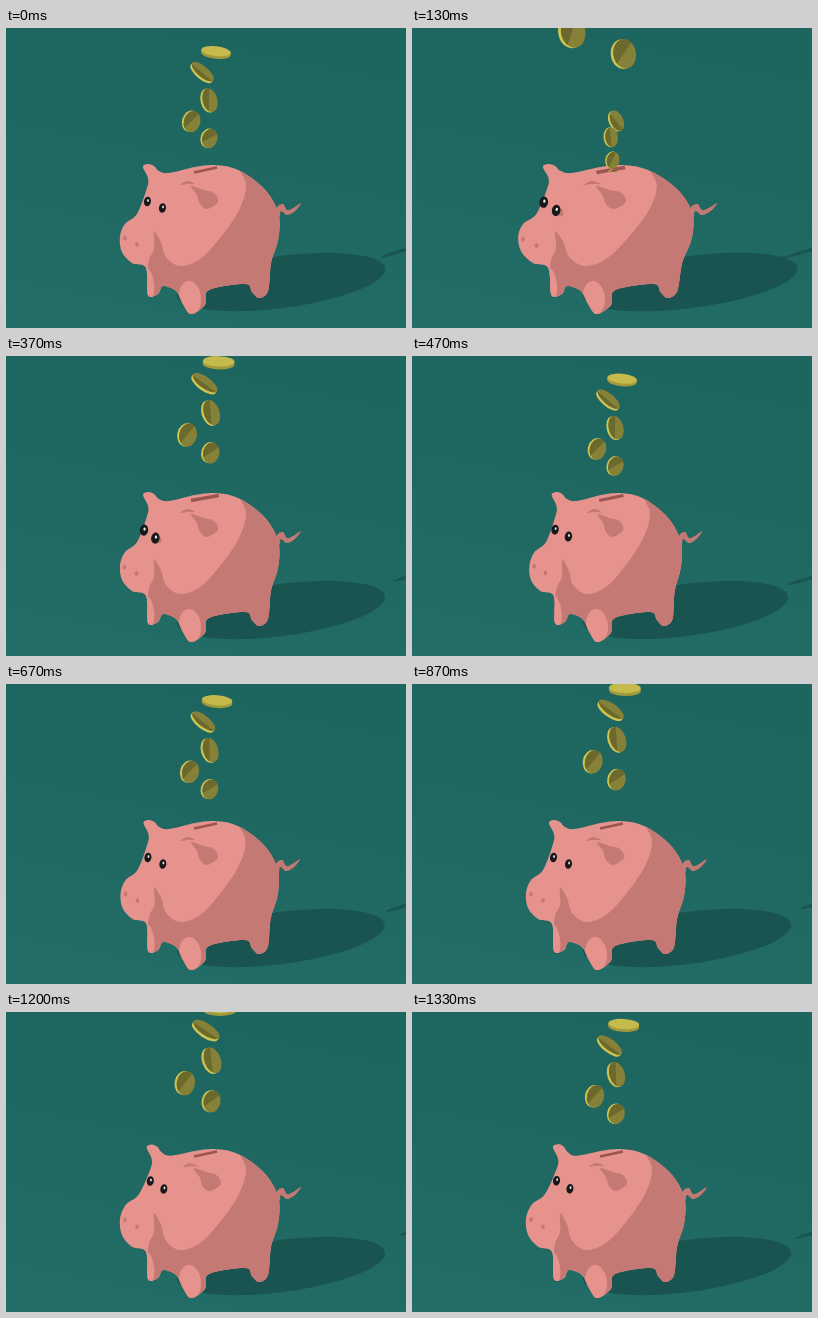
Write an HTML page with a canvas that moves like this. It is 400 px wide and 300 px high and loops after 1.36 s.

```html
<!DOCTYPE html>
<html lang="en">
<head>
<meta charset="utf-8">
<title>Piggy bank</title>
<style>
html, body { margin: 0; width: 100%; height: 100%; overflow: hidden; background: #206963; }
canvas { display: block; width: 400px; height: 300px; }
</style>
</head>
<body>
<canvas id="stage"></canvas>
<script>
const LOOP = 1360;
const FALL = 470;  // time until the next coins have arrived
const BATCH = 137; // distance between two groups of coins
const PINK = '#e6938e', DARK = '#c47974', SHADOW = '#1a5450';
const GOLD = '#cfc452', OLIVE = '#858138', UMBER = '#6c692d';

const canvas = document.getElementById('stage');
const ctx = canvas.getContext('2d');
const dpr = window.devicePixelRatio || 1;
canvas.width = 400 * dpr;
canvas.height = 300 * dpr;

const lerp = (a, b, u) => a + (b - a) * u;
const clamp = v => Math.max(0, Math.min(1, v));
const smooth = v => clamp(v) ** 2 * (3 - 2 * clamp(v));

// Coins rush down, then hover upwards and start to drop again
function drop(t) {
  if (t < FALL) return BATCH * (1 - (1 - t / FALL) ** 1.5);
  const v = (t - FALL) / (LOOP - FALL), top = .72;
  return BATCH - 21 * (v < top ? smooth(v / top) : 1 - ((v - top) / (1 - top)) ** 4);
}

// The pig swells, swings back and settles
const squash = t => t < 700 ? 1.42 * Math.sin(Math.PI * t / 370) * (1 - t / 700) ** .7 : 0;
const fright = t => t < 560 ? Math.sin(Math.PI * (t / 560) ** .8) ** 2 : 0;
const lift = t => smooth((t - 880) / 400) * clamp((LOOP - t) / 30);

// "x,y x,y ..." to a list of points
const points = s => s.split(' ').map(p => p.split(',').map(Number));

const body = points('137,139 142,136 148,138 153,143 163,145 189,139 207,137 227,140 247,151 264,168 273,189 272,212 265,235 262,263 253,270 246,264 239,256 203,262 199,277 185,286 177,276 170,263 157,258 152,266 142,267 140,240 126,235 116,224 114,209 119,196 131,186 141,160 142,150');
const side = points('233,130 240,157 233,182 214,210 194,231 174,238 160,229 155,214 148,204 148,221 142,238 142,290 290,290 290,130');
const ear = points('185,158 198,162 208,165 212,174 201,181 194,176 191,167');
const crease = points('174,157 181,153 189,156 181,156');
const tail = points('269,190 271,179 277,176 281,182 287,180 295,175 289,183 281,187 275,183 273,191');

const coins = [
  { x: 210, y: 24, drift: -.2, tilt: 6, round: .42 },
  { x: 196, y: 44, drift: -.18, tilt: 40, round: .48 },
  { x: 203, y: 72, drift: -.12, tilt: 76, round: .7 },
  { x: 185, y: 93, drift: .3, tilt: 106, round: .85 },
  { x: 203, y: 110, drift: -.1, tilt: 108, round: .86 }
];

// Higher coins cover more distance
const height = (c, o) => c.y + o * (1 + (110 - c.y) / 86 * .3);

function blob(list, color) {
  const n = list.length, at = i => list[(i + n) % n];
  ctx.beginPath();
  ctx.moveTo(...list[0]);
  for (let i = 0; i < n; i++) {
    const [a, b, c, d] = [at(i - 1), at(i), at(i + 1), at(i + 2)];
    ctx.bezierCurveTo(b[0] + (c[0] - a[0]) / 6, b[1] + (c[1] - a[1]) / 6,
      c[0] - (d[0] - b[0]) / 6, c[1] - (d[1] - b[1]) / 6, c[0], c[1]);
  }
  ctx.closePath();
  ctx.fillStyle = color;
  ctx.fill();
}

function oval(x, y, rx, ry, color, turn = 0) {
  ctx.beginPath();
  ctx.ellipse(x, y, rx, ry, turn, 0, Math.PI * 2);
  ctx.fillStyle = color;
  ctx.fill();
}

function drawCoin(c, i, o) {
  const y = height(c, o);
  if (y < -20 || y > 156) return;
  const near = Math.min(o, 0), u = clamp((y - c.y) / (140 - c.y));
  const x = lerp(c.x + c.drift * near, 200, u);
  const angle = lerp(c.tilt + .32 * near, 105, u);
  const r = 16.2 - .058 * y, d = r * .09;
  const s = r * lerp(c.round, .85, u) - d;
  const lit = i === 0 && u < .3;

  ctx.save();
  ctx.translate(x, y);
  ctx.rotate(angle * Math.PI / 180);
  ctx.fillStyle = lit ? '#a1993b' : GOLD;
  ctx.fillRect(-r, -d, 2 * r, 2 * d);
  oval(0, d, r, s, ctx.fillStyle);
  oval(0, -d, r, s, lit ? '#c5bb4d' : OLIVE);
  ctx.clip();
  if (!lit) {
    ctx.rotate(.25 * (i - 1));
    ctx.fillStyle = UMBER;
    ctx.fillRect(-20, 0, 40, 20);
  }
  ctx.restore();
}

function drawGround(o, s) {
  const g = ctx.createLinearGradient(120, 0, 60, 300);
  g.addColorStop(0, '#1d655f');
  g.addColorStop(1, '#226d66');
  ctx.fillStyle = g;
  ctx.fillRect(0, 0, 400, 300);
  oval(275 + 3 * s, 254, 105 + 3 * s, 26, SHADOW, -.13);
  for (const shift of [o, o - BATCH]) {
    for (const c of coins) {
      const away = (110 - height(c, shift)) * .9;
      if (away > -90) oval(388 + away, 225 - away * .3, 13, 1.6, SHADOW, -.3);
    }
  }
}

function drawPig(s, h, f) {
  const warp = ([x, y]) => {
    const head = clamp((172 - x) / 26) * clamp((238 - y) / 45);
    const foot = clamp((y - 200) / 65);
    return [195 + (x - 195) * (1 + .095 * s * (1 - .55 * foot)) + 4 * h * head * clamp((205 - y) / 40), y - 4 * h * head];
  };
  const part = (list, color) => blob(list.map(warp), color);

  part(tail, DARK);
  ctx.save();
  part(body, PINK);
  ctx.clip();
  part(side, DARK);
  oval(184 - 2 * s, 270, 11, 17, PINK, -.1);
  oval(143 - 3 * s, 255, 5, 15, PINK, -.15);
  ctx.restore();

  ctx.save();
  ctx.translate(3 * h, -2 * h);
  part(ear, DARK);
  part(crease, DARK);
  ctx.restore();

  // Slot
  ctx.beginPath();
  ctx.moveTo(188 - 5 * f, 144.5);
  ctx.lineTo(211 + 3 * f, 139.5);
  ctx.lineWidth = 2.8 + f;
  ctx.strokeStyle = '#9a5551';
  ctx.stroke();

  const nostril = (x, y) => {
    const p = warp([x, y]);
    oval(p[0] - f, p[1] + 1.5 * f, 1.9, 2.5, DARK);
  };
  nostril(119, 210);
  nostril(131, 216.5);

  const eye = (x, y, dx, dy, halo) => {
    const p = warp([x, y]);
    const ex = p[0] + dx * f, ey = p[1] + dy * f - h;
    const rx = 3.5 + 1.2 * f, ry = 4.8 + 1.3 * f;
    if (halo) oval(ex + 6 * f, ey + 3 * f, rx * f, ry * f, DARK);
    oval(ex, ey, rx, ry, '#17181a', .15);
    oval(ex + .6, ey - 1, .9 + .4 * f, 1.4 + .3 * f, '#e9e4e1', .2);
  };
  eye(141.5, 173.5, -6, 1, false);
  eye(156.5, 180, -12, 3.5, true);
}

function draw(t) {
  const o = drop(t), s = squash(t);
  ctx.setTransform(dpr, 0, 0, dpr, 0, 0);
  drawGround(o, s);
  drawPig(s, lift(t), fright(t));
  ctx.save();
  ctx.beginPath();
  ctx.rect(0, 0, 400, 143.5); // coins vanish below the slot
  ctx.clip();
  for (const shift of [o, o - BATCH]) coins.forEach((c, i) => drawCoin(c, i, shift));
  ctx.restore();
}

const start = performance.now();
function tick() {
  draw((performance.now() - start) % LOOP);
  requestAnimationFrame(tick);
}
tick();
</script>
</body>
</html>
```
